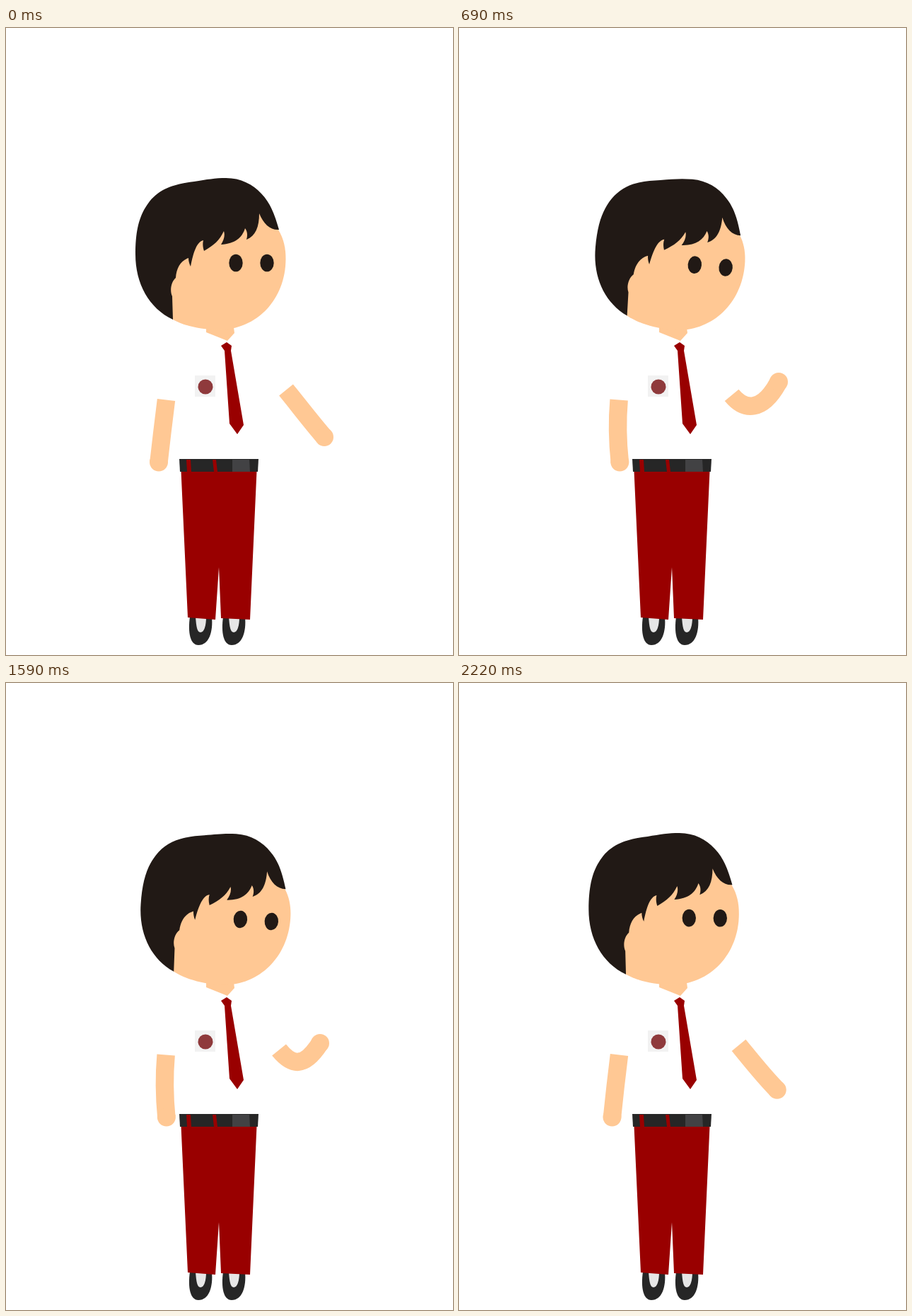
An HTML page for the animation above (2.25 s loop, 632 by 886 pixels).

```html
<!DOCTYPE html>
<html lang="en">
<head>
<meta charset="utf-8">
<title>Schoolboy</title>
<style>
  html, body { margin: 0; width: 100%; height: 100%; overflow: hidden; background: #fff; }
  svg { display: block; width: 632px; height: 886px; }
  .limb { fill: none; stroke: #ffc894; stroke-width: 25.5; }
  .skin { fill: #ffc894; }
  .hair { fill: #211915; }
  .red { fill: #900; }
  .dark { fill: #262626; }
</style>
</head>
<body>
<svg viewBox="0 0 632 886">
  <defs>
    <g id="shoe">
      <path class="dark" d="M260 832C257 853 260 872 272 872C287 872 293 853 291 832Z"/>
      <path fill="#e6e6e6" d="M268 832C269 845 270 854 275 854C280 854 283 845 283 832Z"/>
    </g>
  </defs>

  <g id="sideArm"><path class="limb"/><circle class="skin" r="13"/></g>
  <g id="waveArm"><path class="limb"/><circle class="skin" r="13"/></g>

  <use href="#shoe"/>
  <use href="#shoe" x="47"/>
  <path class="red" d="M247.500 626H354.500L345 836L304 834L301 762L296 836L257 833Z"/>
  <path class="dark" d="M245 609H357L356 627H246Z"/>
  <path class="red" d="M255 610H261L262 627H256ZM292 610H297L299 627H294Z"/>
  <path fill="#424244" d="M320 610H344L345 627H320Z"/>

  <path class="skin" d="M283 415V430L313 442L323 431L321 415Z"/>
  <path class="red" d="M312 444L319 449L318 456L336 561L327 574L316 559L309 456L304 449Z"/>
  <path fill="#f2f2f2" d="M267 491H296V521H267Z"/>
  <circle cx="282" cy="507" r="10.5" fill="#8f3a3c"/>

  <g id="head">
    <path class="skin" d="M385 285C393 298 395.500 312 395.500 326C395.500 383 355 426.500 300 426.500
      C275 426 252 421 236 412L228 403V300L300 240L358 255Z"/>
    <path class="hair" d="M236 412C202 396 183 361 183 320C183 284 189 263 203 245
      C220 224 244 220 266 217C284 214 296 212 311 212C332 212 349 221 361 234
      C375 248 381 268 386 285C374 286 364 277 358 262C358 281 353 294 340 299
      C342 292 341 287 338 283C334 296 324 305 304 306C308 300 310 293 308 287
      C302 300 294 307 280 315C278 309 278 304 279 300C270 302 265 316 261 337
      C259 333 258 329 258 325C247 329 241 339 240 353C234 358 231 370 235 379Z"/>
    <ellipse class="hair" cx="325" cy="332" rx="9.7" ry="12.3"/>
    <ellipse class="hair" cx="369" cy="332" rx="9.7" ry="12.3"/>
  </g>
</svg>
<script>
const LOOP = 2250, STEP = 30;
const $ = id => document.getElementById(id);
const mix = (a, b, k) => a + (b - a) * k;

// Waving hand: time, x, y
const handKeys = [
  [0, 450, 578], [690, 452, 500], [960, 450, 519], [1590, 444, 509], [LOOP, 450, 578]
];

function handAt(t) {
  const i = handKeys.findIndex(key => key[0] > t);
  const [t0, x0, y0] = handKeys[i - 1], [t1, x1, y1] = handKeys[i];
  const k = (t - t0) / (t1 - t0);
  return [mix(x0, x1, k), mix(y0, y1, k)];
}

function drawArm(id, path, x, y) {
  const [limb, hand] = $(id).children;
  limb.setAttribute('d', `${path} ${x} ${y}`);
  hand.setAttribute('cx', x);
  hand.setAttribute('cy', y);
}

function draw(now) {
  const t = Math.floor((now % LOOP) / STEP) * STEP;
  const half = LOOP / 2;
  const sway = 1 - Math.abs(t / half - 1);

  // The head eases into its tilt and returns evenly
  const tilt = 6.6 * (t < half ? 1 - (1 - sway) ** 1.5 : sway);
  $('head').setAttribute('transform', `rotate(${tilt} 299 428)`);

  const swing = 18.5 * sway;
  drawArm('sideArm', `M${226.5 - swing / 30} 525.5Q${221 + swing / 8} 569`, 216 + swing, 613.5);

  // The forearm bends further the higher the hand is lifted
  const [x, y] = handAt(t);
  const lift = (578 - y) / 78;
  const sx = 396 - 17 * sway, sy = 511.5 + 12 * sway;
  const bend = `${x - 19 - 4 * lift} ${y - 22 + 65 * lift}`;
  drawArm('waveArm', `M${sx} ${sy}C${sx + 18} ${sy + 22} ${bend}`, x, y);

  requestAnimationFrame(draw);
}

draw(0);
</script>
</body>
</html>
```
